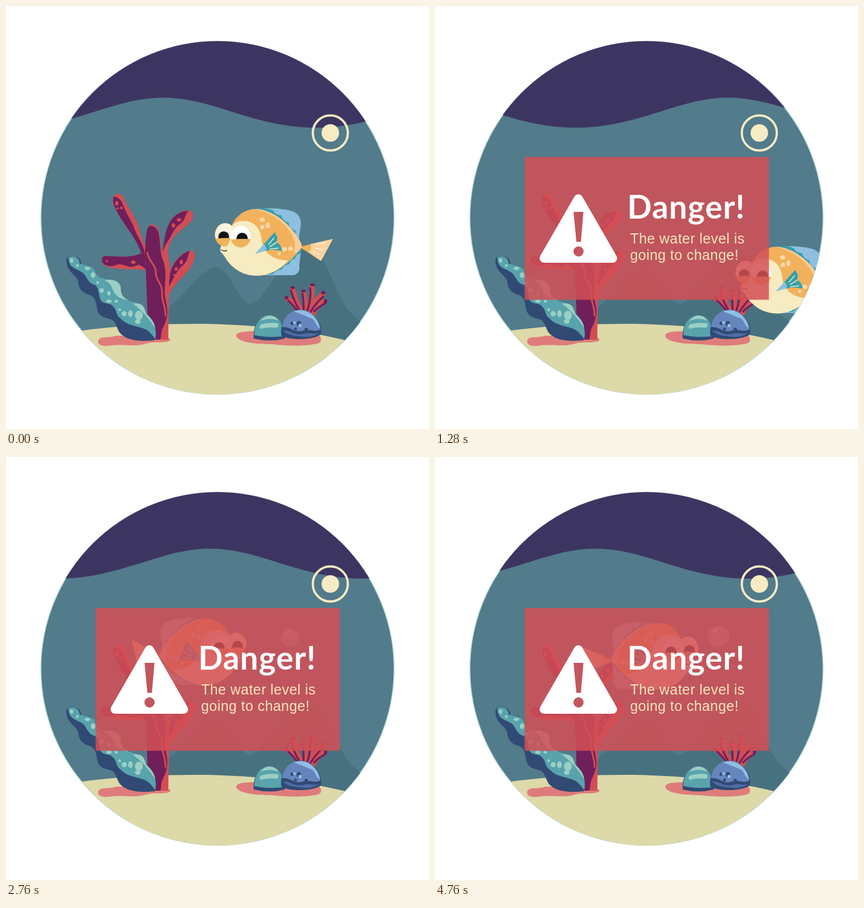
Recreate the animation shown at these times as an HTML page. Size 748 px wide and 748 px high, loop 4800 ms.

```html
<!DOCTYPE html>
<html lang="en">
<head>
<meta charset="utf-8">
<title>Aquarium alert</title>
<style>
html, body { margin: 0; width: 100%; height: 100%; overflow: hidden; background: #fff; }
svg { display: block; width: 100vw; height: 100vh; }
.title { font: 700 57px Lato, sans-serif; letter-spacing: 1.1px; fill: #fff; }
.note { font: 25px "Liberation Sans", Arial, sans-serif; letter-spacing: .45px; fill: #f6e6ba; }
</style>
</head>
<body>
<svg viewBox="0 0 748 748">
<defs>
  <clipPath id="bowl"><circle cx="374" cy="374.5" r="312.5"/></clipPath>
  <clipPath id="nearEye"><path d="M390 380h50v33q-24-3-50 1z"/></clipPath>
  <clipPath id="farEye"><path d="M365 380h40v31q-20-2-40 1z"/></clipPath>
</defs>

<circle cx="374" cy="374.5" r="312.3" fill="#527b8b" stroke="#b9dcda" stroke-width="1.6"/>
<g clip-path="url(#bowl)">
  <path id="sky" fill="#3d3561"/>
  <path fill="#48717f" d="M130 590Q245 572 296 526C326 500 350 462 372 462C394 462 412 527 432 527C456 527 492 432 534 430C575 430 576 526 625 556L650 600Z"/>
  <path fill="#ddd9a9" d="M120 576Q220 561 352 562Q500 565 612 594V700H120Z"/>

  <!-- left corner -->
  <path fill="#df7c7b" d="M163 592C165 582 185 588 194 583H270C290 584 295 591 287 593C272 597 262 592 244 598C224 603 206 597 180 601C168 602 162 598 163 592Z"/>
  <g id="coral">
    <path fill="#d24d53" d="M189 340C191 331 203 329 207 337C211 350 231 375 235 392C238 407 247 424 250 440L247 467C225 464 201 467 182 462C168 459 165 444 177 442C198 443 222 446 239 437C232 412 205 382 197 365C192 354 188 350 189 340Z"/>
    <path fill="#711f5b" d="M190 337C196 336 205 343 207 352C214 370 223 381 228 396C234 410 243 422 246 438L239 437C232 412 205 382 197 365C192 354 188 350 190 337Z"/>
    <path fill="#711f5b" d="M170 453C168 446 171 442 177 442C198 443 222 446 239 437L252 440V467C244 467 241 454 228 460C216 465 207 453 195 458C184 462 175 460 170 453Z"/>
    <path fill="#d24d53" d="M277 434C281 405 283 385 300 370C312 360 328 358 330 367C334 381 316 390 304 401C292 411 288 423 286 433L291 470C295 450 313 434 327 433C338 434 334 448 327 460C319 476 301 486 288 510L287 590H252L246 435C247 417 247 398 252 390C257 383 267 386 270 397C274 411 272 424 277 434Z"/>
    <path fill="#711f5b" d="M277 434C281 405 283 385 300 370C308 364 318 361 323 363C314 370 319 378 308 385C296 394 292 408 285 418C280 424 280 430 277 434ZM289 480C291 456 311 436 325 433C321 442 322 452 311 460C301 469 297 482 288 496Z"/>
    <path fill="#711f5b" d="M246 435C247 417 247 398 252 390C257 386 268 392 270 402C274 425 272 436 278 450C286 474 279 492 281 515C288 540 286 552 278 568C273 578 275 585 273 590H252Z"/>
    <path fill="none" stroke="#d24d53" stroke-width="3" stroke-linecap="round" d="M250 436C252 452 266 458 265 473C264 484 277 491 276 508C275 522 283 532 282 548"/>
    <g fill="#d24d53">
      <circle cx="178" cy="451" r="2"/><ellipse cx="225" cy="453" rx="4" ry="3"/><circle cx="234" cy="460" r="2.500"/>
      <ellipse cx="196" cy="349" rx="3" ry="4"/><circle cx="204" cy="357" r="2.500"/><circle cx="197" cy="358" r="2"/>
      <ellipse cx="306" cy="378" rx="4" ry="3"/><ellipse cx="296" cy="388" rx="3" ry="4"/><circle cx="308" cy="388" r="2"/>
      <ellipse cx="310" cy="453" rx="3" ry="4"/><circle cx="301" cy="465" r="3"/><circle cx="298" cy="476" r="2"/>
    </g>
  </g>
  <path fill="#304a74" d="M107 451C105 441 122 439 130 447C136 455 128 457 143 458C158 459 157 473 165 481C174 489 188 481 193 490C198 506 198 512 211 519C226 529 240 524 244 535C251 549 260 551 264 570Q267 584 263 591C237 594 217 591 207 583C195 575 198 563 188 555C177 551 166 551 162 539C159 526 160 517 149 511C136 509 128 499 128 488C127 477 107 471 107 451Z"/>
  <path fill="#58a3ac" d="M110 445C118 439 131 445 130 455C140 460 154 456 158 470C164 487 184 481 192 487C203 497 198 512 211 518C225 526 241 524 245 536C249 550 264 551 265 580L264 589C251 572 249 572 236 568C219 564 210 561 202 552C194 547 196 537 190 532C183 523 175 529 168 521C163 512 166 500 157 493C143 490 144 476 133 470C122 463 112 464 110 445Z"/>
  <path fill="#9ccfc4" d="M174 485C190 481 204 488 203 501Q203 514 217 521Q194 517 189 502Q186 490 174 485ZM224 526C246 524 244 536 249 546Q262 556 264 570C251 550 242 540 224 526Z"/>
  <g fill="#9ccfc4">
    <ellipse cx="116" cy="450" rx="3" ry="4"/><circle cx="126" cy="459" r="2.500"/><ellipse cx="144" cy="464" rx="5" ry="3"/>
    <ellipse cx="154" cy="476" rx="4" ry="5"/><circle cx="162" cy="489" r="2.500"/><circle cx="169" cy="503" r="4"/>
    <ellipse cx="182" cy="508" rx="3" ry="4"/><ellipse cx="182" cy="522" rx="5" ry="3"/><ellipse cx="195" cy="522" rx="3" ry="2.500"/>
    <circle cx="209" cy="544" r="4.500"/><ellipse cx="220" cy="544" rx="4" ry="6"/><ellipse cx="235" cy="547" rx="7" ry="8"/>
    <ellipse cx="233" cy="558" rx="5" ry="4"/><circle cx="201" cy="537" r="2.500"/>
  </g>

  <!-- right corner -->
  <path fill="#df7c7b" d="M407 583C408 573 438 576 451 575H540C560 581 561 594 551 597C528 602 493 601 470 598C443 598 409 595 407 583Z"/>
  <g fill="none" stroke-linecap="round">
    <path stroke="#d24d53" stroke-width="9" d="M526 548Q513 524 507 501M529 545Q530 524 526 507M533 545Q543 518 541 496M537 545Q546 520 560 510M541 548Q550 528 563 522M522 545Q511 526 498 518"/>
    <path stroke="#711f5b" stroke-width="3.500" d="M520 540Q508 520 504 503M526 538Q527 522 524 509M533 538Q540 518 538 499M539 540Q549 524 561 514M545 540Q554 531 564 526M516 540Q508 529 499 521"/>
  </g>
  <g fill="#711f5b">
    <ellipse cx="507" cy="498" rx="4" ry="2.500"/><ellipse cx="526" cy="504" rx="4" ry="2.500"/><ellipse cx="542" cy="493" rx="4.500" ry="2.500"/>
    <ellipse cx="561" cy="507" rx="4" ry="3"/><ellipse cx="565" cy="522" rx="3" ry="4"/><ellipse cx="496" cy="516" rx="3.500" ry="3"/>
  </g>
  <path fill="#304a74" d="M438 588C436 565 448 548 466 548C484 550 495 568 493 588Q466 595 438 588Z"/>
  <path fill="#58a3ac" d="M439 582C439 560 451 547 466 547C482 548 492 563 491 584Q462 587 439 582Z"/>
  <path fill="#9ccfc4" d="M450 557C458 545 473 544 482 556Q465 550 450 557ZM451 563Q465 559 481 561Q484 568 477 569Q462 567 450 571Q446 567 451 563Z"/>
  <path fill="#304a74" d="M487 583C483 560 499 538 522 537C543 538 560 560 557 580C547 591 501 592 487 583Z"/>
  <path fill="#6785bd" d="M488 568C491 548 503 538 522 537C541 538 555 556 556 572C544 578 538 570 525 574C510 579 503 566 488 568Z"/>
  <path fill="#8fbfe4" d="M509 540C532 532 553 551 555 570C546 565 548 553 536 551C526 546 520 544 509 540Z"/>
  <path fill="#506ca5" d="M490 574C504 573 509 583 525 580C539 576 543 582 554 578Q541 588 519 584Q499 583 490 574Z"/>
  <g fill="#304a74"><circle cx="506" cy="561" r="3"/><ellipse cx="518" cy="562" rx="4" ry="5"/><circle cx="512" cy="571" r="2.500"/><circle cx="531" cy="572" r="3"/></g>
  <g fill="#8fbfe4"><circle cx="510" cy="560" r="2.500"/><circle cx="520" cy="565" r="3"/></g>

  <circle cx="573.500" cy="224.500" r="31" fill="none" stroke="#f6ebc3" stroke-width="4"/>
  <circle cx="573.500" cy="224.500" r="15.500" fill="#f6ebc3"/>

  <g id="bubble">
    <circle r="20" fill="#d5eaf0" opacity=".42"/>
    <path d="M-12-8Q-7-17 4-15Q-5-12-9-4Z" fill="#fff" opacity=".65"/>
  </g>

  <g id="fish">
    <g id="tail">
      <path fill="#f2b15b" d="M519 426L578 412L557 451Z"/>
      <path fill="#f8d3a0" d="M538 421L578 412L557 451L535 435Q543 429 538 421Z"/>
      <path d="M548 421L566 419M546 428L561 431M543 434L554 440" stroke="#fff3d8" stroke-width="1.500"/>
    </g>
    <path fill="#8fbfe0" d="M436 360C462 356 490 358 506 363Q519 367 521 380C523 395 515 405 520 421C524 438 517 453 519 465Q517 475 507 476H455Z"/>
    <path fill="#36a0aa" d="M434 360Q461 355 473 362Q476 370 487 370Q489 380 500 383Q500 394 512 397Q510 408 521 414L522 438Q513 437 511 447Q502 448 501 457Q491 457 488 466Q478 466 472 474L440 475Z"/>
    <path fill="#f2b15b" d="M400 386C411 366 426 359 442 359C472 360 505 386 522 420Q525 426 519 432C499 457 473 477 442 477C420 470 408 442 400 386Z"/>
    <path fill="#f8cd99" d="M440 359C472 360 505 386 522 420Q525 426 518 433Q513 437 508 437C520 412 491 370 440 359Z"/>
    <path fill="#f6ebc1" d="M379 434C378 419 393 388 410 381C435 376 450 390 452 413C455 436 470 449 499 450C483 467 464 477 443 477C417 477 397 462 386 442Z"/>
    <g fill="#f8d7a8">
      <ellipse cx="453" cy="378" rx="5" ry="4"/><ellipse cx="463" cy="388" rx="4" ry="5"/><circle cx="453" cy="391" r="4"/>
      <ellipse cx="492" cy="430" rx="5" ry="4"/><circle cx="503" cy="429" r="4"/><circle cx="483" cy="438" r="3"/>
    </g>
    <path fill="#36a0aa" d="M475 400L480 409L479 417L485 423L489 433Q464 428 441 438Z"/>
    <path fill="#8fbfe0" d="M441 438L456 421Q463 428 459 433Z"/>
    <path d="M464 422L474 410M466 426L480 417M466 430L482 428" stroke="#f6ebc1" stroke-width="1.500"/>
    <ellipse cx="387" cy="404.500" rx="18" ry="20.500" fill="#f2b15b"/>
    <g clip-path="url(#farEye)">
      <ellipse cx="388" cy="404.500" rx="18" ry="20.500" fill="#f9f3e2"/><circle cx="385" cy="408" r="9.500" fill="#111"/>
    </g>
    <path d="M388 426Q396 421 398 402Q400 390 409 384L412 420Z" fill="#f6ebc1"/>
    <ellipse cx="415" cy="407.500" rx="18" ry="19.500" fill="#f2b15b"/>
    <g clip-path="url(#nearEye)">
      <ellipse cx="415" cy="407.500" rx="18" ry="19.500" fill="#fff"/><circle cx="417.500" cy="411" r="10" fill="#111"/>
    </g>
    <path d="M380 431Q386 435 391 432" fill="none" stroke="#3a3142" stroke-width="1.500"/>
  </g>
</g>

<g id="alert">
  <rect x="158.500" y="267" width="432" height="252.500" fill="#d44f55" opacity=".85"/>
  <path d="M253.500 341L314 446H193Z" fill="#fff" stroke="#fff" stroke-width="16" stroke-linejoin="round"/>
  <path d="M245 364H262.500L258 417H250Z" fill="#c2565d"/>
  <circle cx="253.800" cy="434" r="9" fill="#c2565d"/>
  <text class="title" x="340" y="376">Danger!</text>
  <text class="note" x="345" y="420">The water level is</text>
  <text class="note" x="345" y="449">going to change!</text>
</g>
</svg>
<script>
const el = id => document.getElementById(id);
const [sky, fish, tail, bubble, alertBox] = ["sky", "fish", "tail", "bubble", "alert"].map(el);
const STEP = 40, STEPS = 120, CYCLE = 49;

// swim path: step, x, y
const swim = [
  [0, 0, 0], [9, -172, -66], [14, -240, -85], [21, -111, -66],
  [27, 330, 20], [30, 206, 61], [43, 60, 20], [49, 0, 0]
];
// bubbles: birth, reference step, x, y, radius, pop
const bubbles = [[17, 21, 502, 317, 19, 25], [39, 43, 390, 385, 21, 47]];

function slope(i, k) {
  const rate = j => (swim[j + 1][k] - swim[j][k]) / (swim[j + 1][0] - swim[j][0]);
  const last = swim.length - 1;
  return i === 0 || i === last ? (rate(0) + rate(last - 1)) / 2 : (rate(i - 1) + rate(i)) / 2;
}

// cubic Hermite through the swim path
function along(s, k) {
  let i = 0;
  while (s >= swim[i + 1][0]) i++;
  const a = swim[i], b = swim[i + 1], d = b[0] - a[0], u = (s - a[0]) / d, v = 1 - u;
  return a[k] * (1 + 2 * u) * v * v + b[k] * (3 - 2 * u) * u * u
    + d * u * v * (slope(i, k) * v - slope(i + 1, k) * u);
}

function elastic(u) {
  if (u <= 0) return 0;
  if (u >= 1) return 1;
  return 1 + 2 ** (-10 * u) * Math.sin((u - 0.075) * 2 * Math.PI / 0.3);
}

function drawWave(s) {
  const trough = 548 - 76.85 * s;
  let d = "M50 50";
  for (let x = 50; x <= 700; x += 10) {
    const a = (x - trough) * Math.PI / 270;
    const y = 188.6 + 26.5 * (Math.cos(a) + 0.1 * Math.sin(a) ** 2);
    d += `L${x} ${y.toFixed(2)}`;
  }
  sky.setAttribute("d", d + "L700 50Z");
}

function drawFish(s) {
  const right = s >= 15 && s < 28;
  const x = along(s, 1), y = along(s, 2);
  fish.setAttribute("transform", right
    ? `translate(${946 + x} ${y}) scale(-1 1)` : `translate(${x} ${y})`);
  const wag = -8 * (1 - Math.cos(2 * Math.PI * s * 11 / CYCLE));
  tail.setAttribute("transform", `rotate(${wag} 519 426)`);
}

function drawBubble(s) {
  const b = bubbles.find(([birth, , , , , pop]) => s >= birth && s < pop);
  bubble.setAttribute("visibility", b ? "visible" : "hidden");
  if (!b) return;
  const [birth, ref, x, y, r] = b;
  const size = Math.min(1, (s - birth + 1) / 5) * r / 20;
  bubble.setAttribute("transform", `translate(${x} ${y - 3 * (s - ref)}) scale(${size})`);
}

function drawAlert(t) {
  const k = elastic((t - 496) / 480);
  alertBox.setAttribute("visibility", k > 0 ? "visible" : "hidden");
  alertBox.setAttribute("transform", `translate(374.5 393.5) scale(${k}) translate(-374.5 -393.5)`);
}

function render(ms) {
  const n = Math.floor(ms / STEP + 0.001) % STEPS;
  const s = n % CYCLE;
  drawWave(s);
  drawFish(s);
  drawBubble(s);
  drawAlert(n * STEP);
}

const start = performance.now();
function tick() {
  render(performance.now() - start);
  requestAnimationFrame(tick);
}
render(0);
requestAnimationFrame(tick);
</script>
</body>
</html>
```
